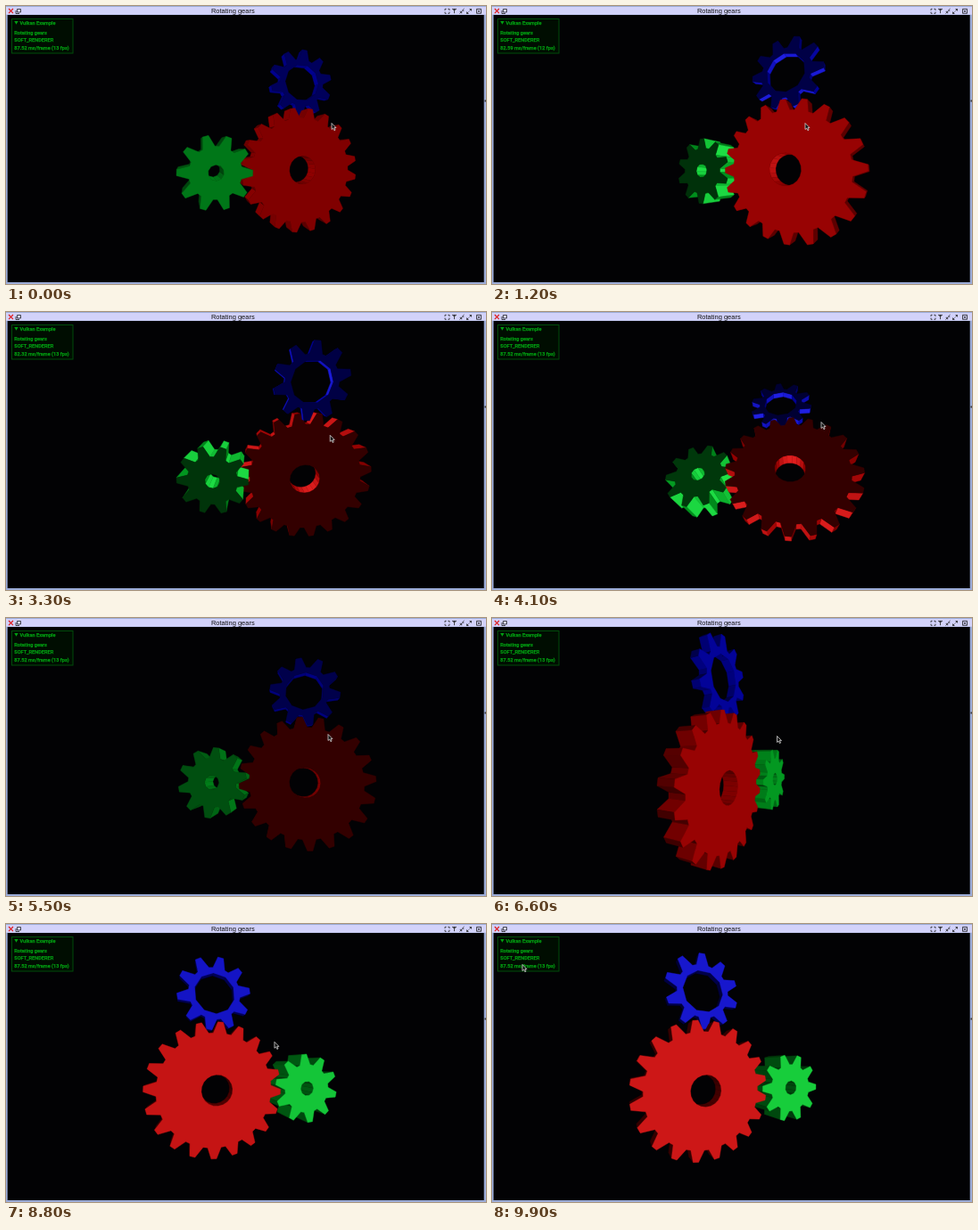
Write an HTML page with a canvas that moves like this. It is 538 by 312 pixels and loops after 10000 ms.

```html
<!DOCTYPE html>
<html lang="en">
<head>
<meta charset="utf-8">
<title>Rotating gears</title>
<style>
  html, body { margin: 0; width: 538px; height: 312px; overflow: hidden; background: #020204; }
  canvas, svg { position: absolute; left: 0; top: 0; display: block; }
  .title { font: 7.5px "Liberation Sans", Arial, sans-serif; fill: #111; }
  .panel { font: 500 5.6px Roboto, "Open Sans", sans-serif; fill: #00a012; stroke: #00a012; stroke-width: .25; }
  .icons { fill: none; stroke: #222; stroke-width: .8; }
</style>
</head>
<body>
<canvas id="scene" width="538" height="312"></canvas>
<svg width="538" height="312" viewBox="0 0 538 312">
  <path fill="#9cacd8" fill-rule="evenodd" d="M0 0H538V312H0ZM1.700 10V310H535.700V10Z"/>
  <path fill="#d2d2fa" d="M0 1H538V9.700H0Z"/>
  <path d="M536.500 105.500h1.500v2h-1.500z" fill="#333"/>
  <text class="title" x="254.3" y="8.3" text-anchor="middle">Rotating gears</text>
  <path d="M3 3L8 8.200M8 3L3 8.200" stroke="#e01818" stroke-width="1.1"/>
  <g class="icons">
    <path d="M12.500 3.500h4v3.500h-4zM11 5v3.500h4"/>
    <path d="M492 5V3.300h1.600M495.400 3.300H497V5M497 6.600v1.700h-1.600M493.600 8.300H492V6.600"/>
    <path d="M500 3.400h5M502.500 3.400v4.800M501.300 5l1.200-1.400L503.700 5"/>
    <path d="M508.500 8.500l2.200-2.200h-2M510.700 6.300v2M513.500 3l-2.200 2.200h2"/>
    <path d="M516.500 8.500l2-2M519.500 5.500l2-2h-2M521.500 3.500v2M516.500 6.500v2h2"/>
    <path d="M527.500 3.300h5v5h-5zM528.700 4.500l2.600 2.600M531.300 4.500l-2.600 2.600"/>
  </g>
  <rect x="6.500" y="14.500" width="68.500" height="38.500" fill="#000d01" stroke="#004c0a" stroke-width="1"/>
  <path d="M9.300 17h4.400l-2.200 3.800z" fill="#00a012"/>
  <g class="panel">
    <text x="15.500" y="21">Vulkan Example</text>
    <text x="9.300" y="32">Rotating gears</text>
    <text x="9.300" y="40.300">SOFT_RENDERER</text>
    <text x="9.300" y="48.800" id="stats"></text>
  </g>
  <path id="cursor" d="M0 0V7L1.700 5.600L2.900 8.200L4.100 7.600L2.900 5.100H5Z" fill="#111" stroke="#eee" stroke-width=".7"/>
</svg>
<script>
const ctx = document.getElementById('scene').getContext('2d');
const stats = document.getElementById('stats');
const cursor = document.getElementById('cursor');

const LOOP = 10000, STEP = 100, RAD = Math.PI / 180;
const VIEW = { x: 269, y: 160, focal: 260 };
const OFFSET = [0.93, 1.5, -16];

// World axes: x right, y down, z out of the front faces.
const GEARS = [
  { x: -3, y: 0, inner: 1, outer: 4, width: 1, teeth: 20, speed: 1, phase: 0, rgb: [1, 0, 0] },
  { x: 3.1, y: 0, inner: 0.5, outer: 2, width: 2, teeth: 10, speed: -2, phase: -9, rgb: [0, 1, 0.2] },
  { x: -3.1, y: -6.2, inner: 1.3, outer: 2, width: 0.5, teeth: 10, speed: -2, phase: -30, rgb: [0, 0, 1] }
];
const TOOTH_DEPTH = 0.7;

// seconds, yaw, pitch, cursor x, cursor y, side light, front light, back light of each gear
const KEYS = [
  [0, 194, 0, 365, 131.5, 0.55, 0.5, 0.53, 0.49, 0.37],
  [1.2, 147, -7, 351, 131.5, 0.75, 0.5, 0.62, 0.19, 0.28],
  [2.6, 188, 54.5, 358.5, 150.5, 0.75, 0.5, 0.2, 0.19, 0.33],
  [4.1, 168, -34, 369, 123.5, 0.75, 0.5, 0.2, 0.22, 0.2],
  [5.5, 172, -4, 361, 130.5, 0.5, 0.58, 0.2, 0.32, 0.3],
  [7.7, -53, 6, 278, 134.5, 0.48, 0.66, 0.2, 0.2, 0.2],
  [9.1, 25, 0, 304, 132, 0.32, 0.75, 0.2, 0.2, 0.2],
  [9.9, 25, 0, 34, 45.5, 0.28, 0.76, 0.2, 0.2, 0.2]
];

function sample(s) {
  let i = 0;
  while (i < KEYS.length - 2 && s > KEYS[i + 1][0]) i++;
  const a = KEYS[i], b = KEYS[i + 1];
  const u = Math.min(1, (s - a[0]) / (b[0] - a[0]));
  const k = u * u * (3 - 2 * u);
  return a.map((v, j) => v + (b[j] - v) * k);
}

function makeCamera(yaw, pitch) {
  const cy = Math.cos(yaw * RAD), sy = Math.sin(yaw * RAD);
  const cp = Math.cos(pitch * RAD), sp = Math.sin(pitch * RAD);
  const [ox, oy, oz] = OFFSET;
  const ey = -oy * cp + oz * sp;
  const ez = -oy * sp - oz * cp;
  return {
    eye: [-ox * cy - ez * sy, ey, -ox * sy + ez * cy],
    project([x, y, z]) {
      const rx = x * cy + z * sy, rz = -x * sy + z * cy;
      const depth = -(oz - y * sp + rz * cp);
      const scale = VIEW.focal / depth;
      return [VIEW.x + (rx + ox) * scale, VIEW.y + (y * cp + rz * sp + oy) * scale];
    }
  };
}

function shade(rgb, light) {
  const gloss = Math.max(0, light - 0.6) * 145;
  return `rgb(${rgb.map(c => Math.round(Math.min(255, c * light * 232 + gloss + c * 5))).join()})`;
}

function fillLoops(camera, loops, color) {
  ctx.beginPath();
  for (const loop of loops) {
    loop.forEach((p, i) => ctx[i ? 'lineTo' : 'moveTo'](...camera.project(p)));
    ctx.closePath();
  }
  ctx.fillStyle = ctx.strokeStyle = color;
  ctx.fill('evenodd');
  ctx.stroke();
}

function outlines(gear, turn) {
  const point = (r, deg) => [gear.x + r * Math.cos(deg * RAD), gear.y + r * Math.sin(deg * RAD)];
  const root = gear.outer - TOOTH_DEPTH / 2, tip = gear.outer + TOOTH_DEPTH / 2;
  const pitch = 360 / gear.teeth, start = gear.speed * turn + gear.phase;
  const rim = [], hole = [];
  for (let i = 0; i < gear.teeth; i++) {
    const a = start + i * pitch;
    [root, tip, tip, root].forEach((r, j) => rim.push(point(r, a + j * pitch / 4)));
    hole.push(point(gear.inner, a));
  }
  return { rim, hole };
}

const distance = (eye, x, y, z) => Math.hypot(eye[0] - x, eye[1] - y, eye[2] - z);

// The walls are lit by a lamp that follows the viewer, nearer to the gears' axis.
function wallLight(eye, x, y, nx, ny) {
  const lx = eye[0] * 0.55 - x, ly = eye[1] - y;
  return 0.5 + 0.6 * Math.max(0, (nx * lx + ny * ly) / Math.hypot(lx, ly, 2));
}

function drawWalls(camera, gear, loop, sign, light) {
  const { eye } = camera, h = gear.width / 2, walls = [];
  loop.forEach((a, i) => {
    const b = loop[(i + 1) % loop.length];
    const len = Math.hypot(b[0] - a[0], b[1] - a[1]);
    const nx = sign * (b[1] - a[1]) / len, ny = sign * (a[0] - b[0]) / len;
    if (nx * (eye[0] - a[0]) + ny * (eye[1] - a[1]) <= 0) return;
    const x = (a[0] + b[0]) / 2, y = (a[1] + b[1]) / 2;
    walls.push({ a, b, far: distance(eye, x, y, 0), lit: light * wallLight(eye, x, y, nx, ny) });
  });
  walls.sort((p, q) => q.far - p.far);
  for (const { a, b, lit } of walls) {
    const quad = [[...a, h], [...b, h], [...b, -h], [...a, -h]];
    fillLoops(camera, [quad], shade(gear.rgb, Math.max(0.2, lit)));
  }
}

function drawGear(camera, gear, turn, side, front, back) {
  const { rim, hole } = outlines(gear, turn);
  const h = gear.width / 2, z = camera.eye[2];
  drawWalls(camera, gear, hole, -1, side);
  drawWalls(camera, gear, rim, 1, side);
  if (Math.abs(z) <= h) return;
  const lift = loop => loop.map(p => [...p, z > 0 ? h : -h]);
  fillLoops(camera, [lift(rim), lift(hole)], shade(gear.rgb, z > 0 ? front : back));
}

function render(ms) {
  const s = ms / 1000;
  const [, yaw, pitch, cx, cy, side, front, ...back] = sample(s);
  const camera = makeCamera(yaw, pitch);
  const turn = -6.75 + 21.7 * (s - 1.2);

  ctx.fillStyle = '#020204';
  ctx.fillRect(0, 0, 538, 312);
  ctx.lineWidth = 0.4;
  GEARS.map((gear, i) => ({ gear, i, far: distance(camera.eye, gear.x, gear.y, 0) }))
    .sort((a, b) => b.far - a.far)
    .forEach(({ gear, i }) => drawGear(camera, gear, turn, side, front, back[i]));

  cursor.setAttribute('transform', `translate(${cx} ${cy})`);
  const frameTime = s < 1 || s >= 3.5 ? '87.52' : s < 2 ? '82.59' : '82.32';
  stats.textContent = `${frameTime} ms/frame (${s >= 1 && s < 2 ? 12 : 13} fps)`;
}

const begin = performance.now();
function tick() {
  const t = (performance.now() - begin) % LOOP;
  render(Math.floor(t / STEP) * STEP);
  requestAnimationFrame(tick);
}
tick();
</script>
</body>
</html>
```
